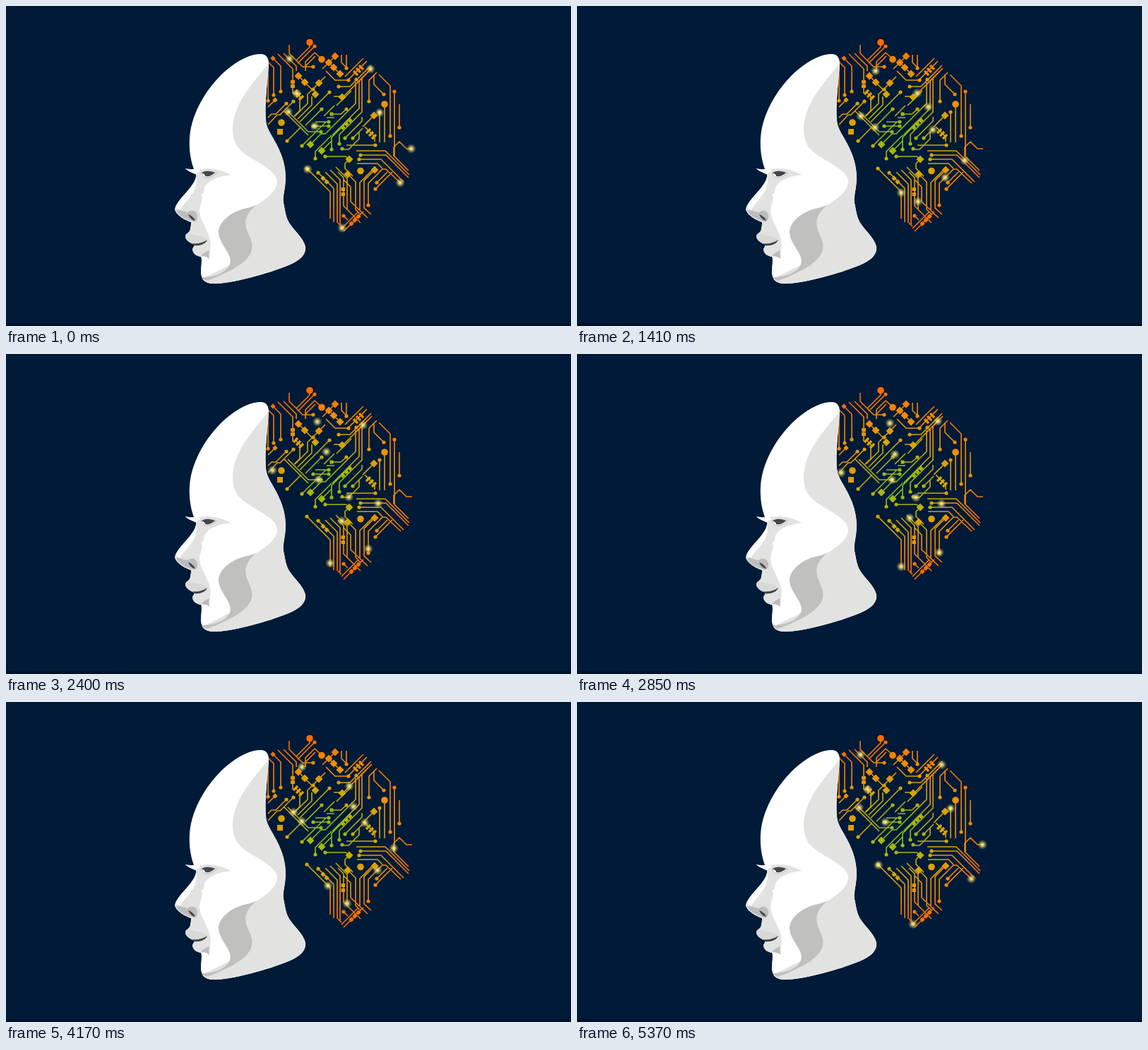
Animation of 800x453 px, one loop 5.4 s. Source, as an HTML page:

```html
<!DOCTYPE html>
<html lang="en">
<head>
<meta charset="utf-8">
<title>Circuit mind</title>
<style>
html, body { margin: 0; width: 100%; height: 100%; overflow: hidden; background: #001a38; }
svg { display: block; width: 100vw; height: 100vh; }
.wire { fill: none; stroke: url(#heat); stroke-width: 1.6; stroke-linejoin: round; }
.node { fill: none; stroke: url(#heat); stroke-width: 5.2; stroke-linecap: round; }
.disc { fill: none; stroke: url(#heat); stroke-width: 9.6; stroke-linecap: round; }
.chip { fill: url(#heat); }
.bar { fill: none; stroke: url(#heat); stroke-width: 3.4; }
</style>
</head>
<body>
<svg viewBox="0 0 800 453" preserveAspectRatio="none">
  <defs>
    <radialGradient id="heat" gradientUnits="userSpaceOnUse" cx="456" cy="182" r="135">
      <stop offset="0" stop-color="#7cbc14"/>
      <stop offset=".2" stop-color="#a3b80c"/>
      <stop offset=".42" stop-color="#d2a808"/>
      <stop offset=".68" stop-color="#ef9004"/>
      <stop offset="1" stop-color="#ff6a00"/>
    </radialGradient>
    <radialGradient id="glow">
      <stop offset="0" stop-color="#fff3a8"/>
      <stop offset=".3" stop-color="#f0dc78" stop-opacity=".85"/>
      <stop offset=".6" stop-color="#d9c860" stop-opacity=".45"/>
      <stop offset="1" stop-color="#d9c860" stop-opacity="0"/>
    </radialGradient>
  </defs>

  <rect width="800" height="453" fill="#001a38"/>
  <rect y="449" width="800" height="4" fill="#00122b"/>

  <!-- wires: top -->
  <path class="wire" d="M401 55V67L420 86H435M430 53V58L411 77M437 57L413 81M378 74L389 85V120
    M371 79L379 87V126M371 85V134M385 68L406 89V124M393 67L411 85V92M424 92V85L438 71M424 86V79L437 66L447 75
    M466 71L448 89M457 80L473 96M475 69V80L482 87M482 69V87M453 92L466 105H485M414 99L435 120M443 109L428 124
    M452 100L435 117M506 74L480 100M511 78L485 104M517 84L487 114H471M518 88L478 128H464
    M525 94L514 105V135M521 97V111L535 125M528 97L544 113V184M550 121V212M536 139V193M529 150V193M557 139V172"/>
  <!-- wires: middle -->
  <path class="wire" d="M381 133L371 143M397 138L382 153H376L371 158M407 135L388 154H384L371 168
    M410 122L416 128V148L408 156M427 124V138L409 156M433 128V140L413 160M458 122L416 164M447 146L424 169
    M394 149L428 183M399 149L428 178H446M398 191L418 171M419 198L453 164H457M435 170H457M438 164H457M454 158H465
    M461 153H474L482 146M489 120L468 141M495 108V138L466 167L452 181H446M500 106V145L462 183
    M504 101V150L472 182V195M511 95L497 109M461 203V186L488 159M438 216V206L461 183M431 196L446 181
    M447 205L461 191M465 141L450 156M480 187L504 163V157M491 187L505 173M521 155L505 171
    M508 171L522 185V192M500 179V188L485 203H476M482 197H523M452 213H481L486 217"/>
  <!-- wires: bottom -->
  <path class="wire" d="M496 205H537L571 239M502 211H538L570 243M500 217H531L563 249M497 223H526L533 230
    M575 202H567L557 192L549 200V212L570 233
    M426 230L459 263V301M442 236L464 258V306M452 235L469 252V307M459 232L473 246V309M467 228L483 244V288L502 307
    M470 235L478 243V283L498 303M478 246L488 256V277L512 300M484 238L495 249V288L502 295M486 217L480 223V230L491 241
    M522 232L507 247V286L517 295M513 282V251L533 231H538L559 251M523 259L547 235M525 250L540 235M501 290V250L519 232
    M475 315L499 291M478 319L506 291M470 307L475 312M478 297L484 303"/>

  <path class="node" d="M435 86h0M437 57h0M389 121h0M379 126h0M371 134h0M482 88h0M485 105h0M471 114h0M514 135h0M535 125h0
    M550 121h0M544 184h0M557 172h0M529 150h0M397 138h0M407 135h0M458 122h0M435 118h0M398 191h0M419 198h0M457 164h0
    M435 170h0M457 170h0M446 178h0M482 146h0M461 203h0M472 195h0M438 216h0M480 187h0M491 187h0M523 197h0M476 202h0
    M452 213h0M502 211h0M500 217h0M426 230h0M442 236h0M513 282h0M523 259h0M525 250h0M478 297h0M496 104h0M447 146h0"/>
  <path class="disc" d="M430 51.500h0M447 75.500h0M536 139h0M390 165h0M502 233.500h0"/>
  <path class="bar" d="M407 125l6-6M411 129l6-6M415 133l6-6M492 92l6 6M496 88l6 6M500 84l6 6M510 180l6-6M514 184l6-6M518 188l6-6"/>
  <g id="chips" class="chip">
    <path d="M384 174h8v8h-8zM403 105h6v5h-6zM403 111h6v5h-6zM458.500 150.500h5v5h-5zM474.500 257h5.500v5h-5.500zM474.500 264h5.500v5h-5.500z"/>
  </g>

  <!-- head -->
  <path fill="#fff" d="M361 68C368 68 372 73 372 82C370 110 366 140 368 162C369 176 379 185 387 204C396 224 397 240 395 256C393 268 392 274 393 279
    C395 288 396 299 401 307C408 318 421 328 424 341C425 352 417 360 400 367C371 379 320 393 294 393C281 393 275 386 276 374C276 366 278 360 276 355
    C270 354 265 351 264 345C264 342 267 340 267 338C260 335 254 331 254 326C255 321 261 321 261 315C262 311 262 309 262 306
    C253 303 241 296 239 288C240 279 252 268 260 258C267 249 270 243 269 237C264 236 258 234 254 230C259 232 263 232 266 231
    C261 217 259 203 260 186C263 148 288 111 313 90C331 75 347 68 361 68Z"/>
  <path fill="#e2e3e1" d="M372 81C370 110 366 140 368 162C369 176 379 185 387 204C396 224 397 240 395 256C393 268 392 274 393 279
    C395 288 396 299 401 307C408 318 421 328 424 341C425 352 417 360 400 367C371 379 320 393 294 393C286 393 280 390 278 386L330 360L342 290
    C362 277 384 265 384 248C382 229 346 219 331 203C317 188 319 163 329 141C340 118 358 99 372 81Z"/>
  <path fill="#c0c0bf" d="M355 281C340 294 337 304 341 317C345 328 350 335 348 345C344 363 316 377 285 389C281 388 278 386 277 384
    C291 384 311 379 317 366C322 352 303 339 301 322C300 306 318 292 337 287C344 285 350 284 355 281Z"/>

  <!-- shaded front of the face -->
  <path fill="#e2e3e1" d="M269 238L318 239C302 241 288 246 282 255C279 260 282 265 276 267C281 271 274 281 274 290C275 302 281 309 284 318
    C288 326 291 333 289 342L288 357C284 354 280 353 276 355C270 354 265 351 264 345C264 342 267 340 267 338
    C260 335 254 331 254 326C255 321 261 321 261 315C262 311 262 309 262 306C253 303 241 296 239 288
    C243 279 254 268 261 259C267 251 270 245 269 238Z"/>

  <!-- brow and eye -->
  <path fill="#e2e3e1" d="M254 230C266 233 282 228 297 231C306 233 313 236 318 239L270 239C264 236 258 234 254 230Z"/>
  <path fill="#fff" d="M254 230C260 233 266 231 272 230L276 234C272 235 270 236 269 238C264 236 258 234 254 230Z"/>
  <path fill="#c3c3c3" d="M275 236C282 232 290 232 299 236C294 242 287 245 280 243C279 240 277 238 275 236Z"/>
  <path fill="#fff" d="M278 238C285 234 292 235 297 237C292 241 286 243 281 242Z"/>
  <path fill="#44464b" d="M277 236C284 232 291 234 296 236C292 240 287 242 282 241C282 239 280 237 277 236Z"/>

  <!-- nose -->
  <path fill="#fff" d="M269 241C271 249 269 257 265 264C259 273 251 281 246 289L241 286C245 278 256 267 262 258C266 252 269 247 269 241Z"/>
  <path fill="#bdbdbd" d="M241 289C246 288 251 291 257 292C263 288 268 289 270 294C273 300 270 305 266 305C255 303 244 297 241 289Z"/>
  <path fill="#46484d" d="M258 295C262 296 267 300 268 304C263 303 260 300 258 295Z"/>

  <!-- mouth -->
  <path fill="#d8d8d7" d="M256 322C266 324 276 324 285 331C280 337 273 339 267 338C260 335 254 331 254 326C254 324 255 323 256 322Z"/>
  <path fill="#bbb" d="M276 354C279 350 283 348 288 346C287 350 287 354 288 358C285 355 281 354 276 354Z"/>
  <path fill="#45474b" d="M264 336C272 337 279 335 285 331C283 337 274 340 267 339Z"/>

  <g id="sparks"></g>
</svg>
<script>
const NS = "http://www.w3.org/2000/svg";
const add = (parent, tag, attrs) => {
  const el = document.createElementNS(NS, tag);
  for (const key in attrs) el.setAttribute(key, attrs[key]);
  return parent.appendChild(el);
};

const chips = document.getElementById("chips");
const diamonds = (size, spots) => spots.split(" ").forEach(spot => {
  const [x, y] = spot.split(",");
  add(chips, "path", { d: `M${x} ${y - size}l${size} ${size}l${-size} ${size}l${-size} ${-size}z` });
});
diamonds(5.5, "466,71 457,80 464,87 473,96 414,99 423,108 443,109 438,125 476,129 521,155 431,196 447,205 486,217 484,238 522,232");
diamonds(3.7, "378,74 381,133 477,172 482,167 487,162 449,244 454,249 494,303 489,308 499,298");

// Each "|" opens a new leg: its first point is reached at the leg's time,
// further points are corners on the way to the next leg.
const HALF = 2700;
const legTimes = [0, 840, 1230, 1980, 2550, HALF];
const routes = [
  "401,74|413,87|419,92 422,92|434,91 436,91|443,98|445,100",
  "517,88|496,110|486,119 477,128|464,128|450,142|446,146",
  "411,123 416,128|416,148|407,156 404,156|387,155|374,168|371,171",
  "399,149|412,162|419,169 428,178|432,178|446,178|449,178",
  "529,150 529,162|521,170|508,171 500,179 500,188|497,191 485,203|480,203|476,203",
  "435,170 471,170|479,162|492,148 499,141|499,120 499,107|511,95|516,90",
  "575,202 567,202 557,192|554,195 549,200|549,207 549,222 562,235|552,225 538,211|516,212|505,212",
  "559,251|538,231 533,231|526,238 513,251|513,261|513,281|513,286",
  "426,230|447,251|456,260 459,263|459,282|459,301|459,306",
  "475,315 490,300|490,295 483,288|483,285|482,251 482,243|471,232|467,228"
];

function keyframes(route) {
  const stops = [];
  route.split("|").forEach((leg, i) => leg.split(" ").forEach((point, j) => {
    const [x, y] = point.split(",").map(Number);
    const last = stops[stops.length - 1];
    const dist = last ? last.dist + Math.hypot(x - last.x, y - last.y) : 0;
    stops.push({ x, y, dist, time: j ? null : legTimes[i] });
  }));
  const timed = stops.filter(s => s.time !== null);
  return stops.map(s => {
    const next = timed.findIndex(m => m.dist > s.dist);
    let time = s.time;
    if (time === null) {
      const a = timed[next - 1], b = timed[next];
      time = a.time + (b.time - a.time) * (s.dist - a.dist) / (b.dist - a.dist);
    }
    return { offset: time / HALF, transform: `translate(${s.x}px, ${s.y}px)` };
  });
}

const sparks = document.getElementById("sparks");
routes.forEach(route => {
  const spark = add(sparks, "circle", { r: 7, fill: "url(#glow)" });
  const run = spark.animate(keyframes(route), { duration: HALF, direction: "alternate", iterations: Infinity });
  run.startTime = 0;
});
</script>
</body>
</html>
```
